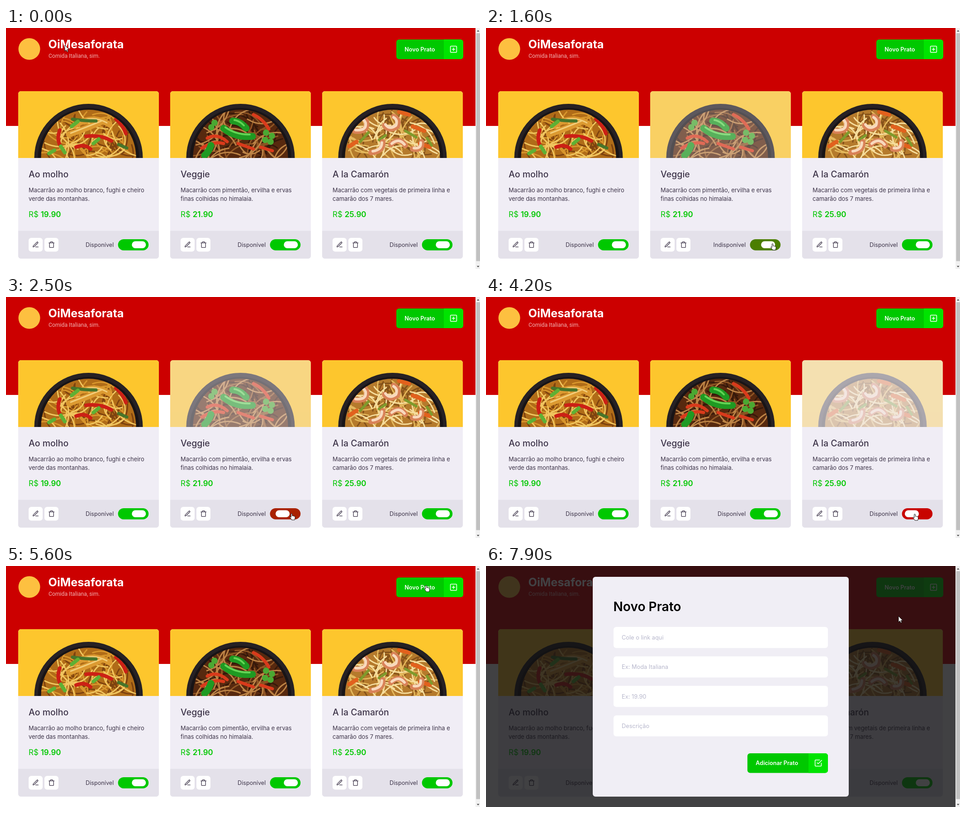
These frames come from a looping animation (1048x534 px, 8000 ms). An HTML page:

```html
<!DOCTYPE html>
<html lang="pt-BR">
<head>
<meta charset="utf-8">
<title>Cardápio</title>
<style>
  html, body { margin: 0; width: 100%; height: 100%; overflow: hidden; background: #fff; }
  svg { display: block; width: 1048px; height: 534px; }
  text { font-family: Inter, "Open Sans", sans-serif; font-size: 12.9px; fill: #3d3449; white-space: pre; }
  .brand { font-size: 25.2px; font-weight: 700; fill: #fff; }
  .tag { font-family: Roboto, sans-serif; font-size: 12.2px; fill: #f0b2b2; }
  .btn { font-size: 12.6px; font-weight: 600; fill: #fff; }
  .name { font-size: 19.5px; font-weight: 500; }
  .price { font-size: 17px; fill: #00c800; }
  .price tspan { font-weight: 600; }
  .state { font-size: 12.7px; text-anchor: end; }
  .title { font-size: 28.1px; font-weight: 600; fill: #000; }
  .hint { font-size: 12.8px; fill: #b7b7cc; }
  .icon { fill: none; stroke-width: 2; stroke-linecap: round; stroke-linejoin: round; }
  .food path { fill: none; stroke-linecap: round; stroke-linejoin: round; }
</style>
</head>
<body>
<svg id="stage" viewBox="0 0 1048 534"></svg>
<script>
const LOOP = 8000, STEP = 100;
const GREEN = [0, 200, 0], RED = [204, 0, 0];

const ICONS = {
  edit: 'M12 20h9M16.5 3.5a2.12 2.12 0 0 1 3 3L7 19l-4 1 1-4L16.5 3.5z',
  trash: 'M3 6h18M19 6v14a2 2 0 0 1-2 2H7a2 2 0 0 1-2-2V6m3 0V4a2 2 0 0 1 2-2h4a2 2 0 0 1 2 2v2',
  plus: 'M5 3h14a2 2 0 0 1 2 2v14a2 2 0 0 1-2 2H5a2 2 0 0 1-2-2V5a2 2 0 0 1 2-2zM12 8v8M8 12h8',
  check: 'M9 11l3 3L22 4M21 12v7a2 2 0 0 1-2 2H5a2 2 0 0 1-2-2V5a2 2 0 0 1 2-2h11'
};

// toppings: [colour, line width, path]
const DISHES = [
  {
    x: 27, name: 'Ao molho', price: '19.90',
    text: ['Macarrão ao molho branco, fughi e cheiro', 'verde das montanhas.'],
    base: '#b06c18', noodles: ['#7d420f', '#d8962c', '#f0c55f'],
    toppings: [
      ['#cc2015', 8, 'M92 86Q84 108 94 122M150 100Q182 96 206 110M216 62Q232 76 238 94M128 124Q146 116 160 128'],
      ['#dc9a31', 13, 'M112 96Q148 84 188 66M124 76Q164 50 202 74'],
      ['#f2cd7a', 3, 'M116 93Q150 80 184 66M130 70Q164 52 196 70'],
      ['#47752a', 7, 'M120 62Q146 66 172 66M222 118l18 8'],
      ['#5fb034', 8, 'M94 122l9 14M118 78l14-11M166 116l12-10M68 138l12-7']
    ]
  },
  {
    x: 363, name: 'Veggie', price: '21.90',
    text: ['Macarrão com pimentão, ervilha e ervas', 'finas colhidas no himalaia.'],
    base: '#57290f', noodles: ['#35180a', '#8f5524', '#bd8446'],
    toppings: [
      ['#d93a1b', 7, 'M82 104Q104 92 126 112M184 52Q206 62 218 84M70 126Q96 110 118 116M200 124l26 8M150 116l34 12'],
      ['#1f9a22', 15, 'M118 82Q144 104 182 100M138 66Q154 66 168 82M76 142Q86 134 90 120'],
      ['#63d455', 4, 'M122 80Q146 97 176 96M142 64Q154 66 163 76'],
      ['#4ba832', 14, 'M212 92v0M225 99v0M210 108v0M222 112v0M98 70v0M91 80v0']
    ]
  },
  {
    x: 699, name: 'A la Camarón', price: '25.90',
    text: ['Macarrão com vegetais de primeira linha e', 'camarão dos 7 mares.'],
    base: '#b57a2c', noodles: ['#85521a', '#e3b75c', '#f6dd9c'],
    toppings: [
      ['#e2611d', 9, 'M200 78l26 10M170 46l22 6M216 116l22 8M60 122l16-10'],
      ['#7f9a2c', 6, 'M184 88l24 14M84 112l18-20M140 98l-14 10M232 104l10 16'],
      ['#d98258', 12, 'M72 88Q102 92 98 68Q92 54 78 62M138 76Q148 90 166 78Q172 62 158 56M108 136Q136 134 134 112M152 118Q170 100 184 120M200 128Q222 132 220 112'],
      ['#f8d9bd', 6, 'M74 86Q99 88 96 70Q91 58 80 62M140 74Q149 86 163 76Q168 64 158 58M112 133Q132 130 132 114M154 116Q170 103 182 118M203 126Q219 128 218 114']
    ]
  }
];

// [time, knob, colour, picture fade]
const IDLE = [[0, 0, 0, 0]];
const SWITCHES = [
  IDLE,
  [[1500, 0, 0, 0], [1600, .25, .37, .39], [1700, .6, .7, .65], [1800, .9, .92, .85], [1900, 1, 1, .96],
   [2000, 1, 1, 1], [2400, 1, 1, 1], [2500, .75, .83, .61], [4100, .75, .83, .61], [4200, 0, 0, 0]],
  [[4100, 0, 0, 0], [4200, 1, .98, .94], [4300, .65, .65, .6], [4400, .2, .25, .25], [4500, 0, 0, 0]]
];

// [time, x, y] of the pointer tip
const POINTER = [
  [0, 130, 38], [100, 201, 105], [200, 201, 105], [700, 455, 330], [1000, 625, 470], [1100, 633, 475],
  [1200, 633.5, 478], [2400, 633.5, 478], [2500, 631.5, 480], [4100, 631.5, 480], [4200, 948, 481],
  [4600, 948, 481], [4700, 936, 440], [4900, 905, 260], [5000, 901, 160], [5100, 912, 85], [5200, 929, 43],
  [7300, 929, 43], [7400, 919, 59], [7500, 919, 59], [7600, 913, 68], [7800, 913, 68], [7900, 912, 111]
];

const rect = (x, y, w, h, fill, r = 0, more = '') =>
  `<rect x="${x}" y="${y}" width="${w}" height="${h}" rx="${r}" fill="${fill}" ${more}/>`;
const text = (x, y, cls, str, more = '') => `<text x="${x}" y="${y}" class="${cls}" ${more}>${str}</text>`;
const icon = (name, cx, cy, size, color) =>
  `<path class="icon" stroke="${color}" d="${ICONS[name]}" transform="translate(${cx - size / 2} ${cy - size / 2}) scale(${size / 24})"/>`;

function button(x, y, w, label, glyph) {
  const split = x + w - 43;
  return rect(x, y, w, 43.5, '#00c800', 6) +
    `<path d="M${split} ${y}h37a6 6 0 0 1 6 6v31.5a6 6 0 0 1-6 6h-37z" fill="#00e400"/>` +
    text(x + 18.3, y + 26, 'btn', label) + icon(glyph, split + 21.5, y + 21.7, 18.4, '#fff');
}

function random(seed) {
  return () => (seed = seed * 16807 % 2147483647) / 2147483647;
}

function noodles(color, rnd) {
  let d = '';
  for (let i = 0; i < 26; i++) {
    const a = Math.PI * (1 + rnd()), r = 98 * Math.sqrt(rnd());
    const x = 155.5 + r * Math.cos(a), y = 148 + r * Math.sin(a);
    const turn = rnd() * 6.3, len = 18 + 22 * rnd();
    const dx = len * Math.cos(turn), dy = len * Math.sin(turn);
    d += `M${x - dx} ${y - dy}Q${x + dy * .6} ${y - dx * .6} ${x + dx} ${y + dy}`;
  }
  return `<path d="${d}" stroke="${color}" stroke-width="3"/>`;
}

function food(dish, i) {
  const rnd = random(4711 + i * 977);
  return `<g id="pic${i}" class="food" clip-path="url(#photo)">` + rect(0, 0, 311, 148, '#fdc62d') +
    '<circle cx="155.5" cy="148" r="120" fill="#262124"/><circle cx="155.5" cy="149" r="112" fill="#181416"/>' +
    `<g clip-path="url(#bowl)">` + rect(0, 0, 311, 148, dish.base) +
    dish.noodles.map(c => noodles(c, rnd)).join('') +
    dish.toppings.map(([c, w, d]) => `<path d="${d}" stroke="${c}" stroke-width="${w}"/>`).join('') +
    '</g></g>';
}

function card(dish, i) {
  return `<g transform="translate(${dish.x} 140)">` +
    rect(0, 0, 311, 371, '#f0edf5', 6) + food(dish, i) +
    '<path d="M0 309.5H311V365a6 6 0 0 1-6 6H6a6 6 0 0 1-6-6z" fill="#e4e1ea"/>' +
    text(23, 190.5, 'name', dish.name) +
    dish.text.map((line, n) => text(23, 223.5 + n * 19.3, '', line)).join('') +
    text(23, 279, 'price', `R$ <tspan>${dish.price}</tspan>`) +
    rect(23, 325, 31, 30.5, '#fff', 6) + icon('edit', 38.5, 340, 15.5, '#3d3449') +
    rect(58, 325, 31, 30.5, '#fff', 6) + icon('trash', 73.7, 340, 15.5, '#3d3449') +
    text(211.3, 345, 'state', 'Disponível', `id="state${i}"`) +
    rect(220.7, 328, 67.5, 24.7, '#00c800', 12.3, `id="track${i}"`) +
    rect(251.3, 332.6, 31, 15.5, '#fff', 7.7, `id="knob${i}"`) + '</g>';
}

function dialog() {
  const hints = ['Cole o link aqui', 'Ex: Moda Italiana', 'Ex: 19.90', 'Descrição'];
  return '<g id="dialog">' + rect(0, 0, 1038, 534, 'rgba(18,18,20,.8)') +
    rect(236, 24, 566, 487, '#f0eef5', 6) + text(281.5, 100.3, 'title', 'Novo Prato') +
    hints.map((hint, n) => rect(282, 135 + n * 65.3, 474, 46.7, '#fff', 6) +
      text(300, 163 + n * 65.3, 'hint', hint)).join('') +
    button(578, 415, 178, 'Adicionar Prato', 'check') + '</g>';
}

const $ = id => document.getElementById(id);

$('stage').innerHTML =
  '<defs><clipPath id="photo"><path d="M0 148V6a6 6 0 0 1 6-6H305a6 6 0 0 1 6 6V148z"/></clipPath>' +
  '<clipPath id="bowl"><circle cx="155.5" cy="146" r="105"/></clipPath></defs>' +
  rect(0, 0, 1038, 217, '#c00') +
  '<circle cx="51.5" cy="46.5" r="24" fill="#fdc040"/>' +
  text(93.5, 44.7, 'brand', 'OiMesaforata') + text(94, 66, 'tag', 'Comida Italiana, sim.') +
  button(863, 25.5, 148, 'Novo Prato', 'plus') +
  DISHES.map(card).join('') + dialog() +
  rect(1038, 0, 10, 534, '#f1f1f1') + rect(1039.5, 11.5, 8.5, 505, '#c1c1c1') +
  '<path d="M1041 8h5.6l-2.8-3.4zM1041 527h5.6l-2.8 3.4z" fill="#555"/>' +
  '<g id="pointer" fill="#fff" stroke="#000" stroke-width=".9" stroke-linejoin="round">' +
  '<path id="arrow" d="M0 0V13.4L3.1 10.6 5.1 15 7.3 14 5.4 9.8H9.5Z"/>' +
  '<path id="hand" d="M-1.3 1C-1.3-.4 1.3-.4 1.3 1V5.2C1.6 4.3 3.4 4.4 3.5 5.6 4 4.8 5.6 5 5.7 6.2 6.2 5.6 7.6 6 7.6 7.2V10C7.6 11.5 6.6 12.4 6.6 14H.2C0 12.4-2.8 10.2-3.8 8.2-4.2 6.8-2.6 6.6-1.3 8.4Z"/></g>';

// linear value of a table at time t
function at(keys, t) {
  const n = keys.findIndex(k => k[0] > t);
  if (n === 0) return keys[0].slice(1);
  if (n < 0) return keys[keys.length - 1].slice(1);
  const a = keys[n - 1], b = keys[n], p = (t - a[0]) / (b[0] - a[0]);
  return a.slice(1).map((v, i) => v + (b[i + 1] - v) * p);
}

const show = (id, on) => $(id).setAttribute('visibility', on ? 'visible' : 'hidden');

function draw(time) {
  const t = Math.floor(time % LOOP / STEP) * STEP;
  SWITCHES.forEach((keys, i) => {
    const [knob, tint, fade] = at(keys, t);
    const rgb = GREEN.map((v, c) => Math.round(v + (RED[c] - v) * tint));
    $('knob' + i).setAttribute('x', 251.3 - 24.3 * knob);
    $('track' + i).setAttribute('fill', `rgb(${rgb})`);
    $('pic' + i).setAttribute('opacity', 1 - .7 * fade);
  });
  $('state1').textContent = t >= 1600 && t < 2500 ? 'Indisponível' : 'Disponível';

  const [x, y] = at(POINTER, t);
  const hand = t >= 1000 && t < 4700 || t >= 5200 && t < 5700;
  $('pointer').setAttribute('transform', `translate(${x} ${y})`);
  show('hand', hand);
  show('arrow', !hand);
  show('dialog', t >= 5700);
}

const start = performance.now();
function tick() {
  draw(performance.now() - start);
  requestAnimationFrame(tick);
}
tick();
</script>
</body>
</html>
```
